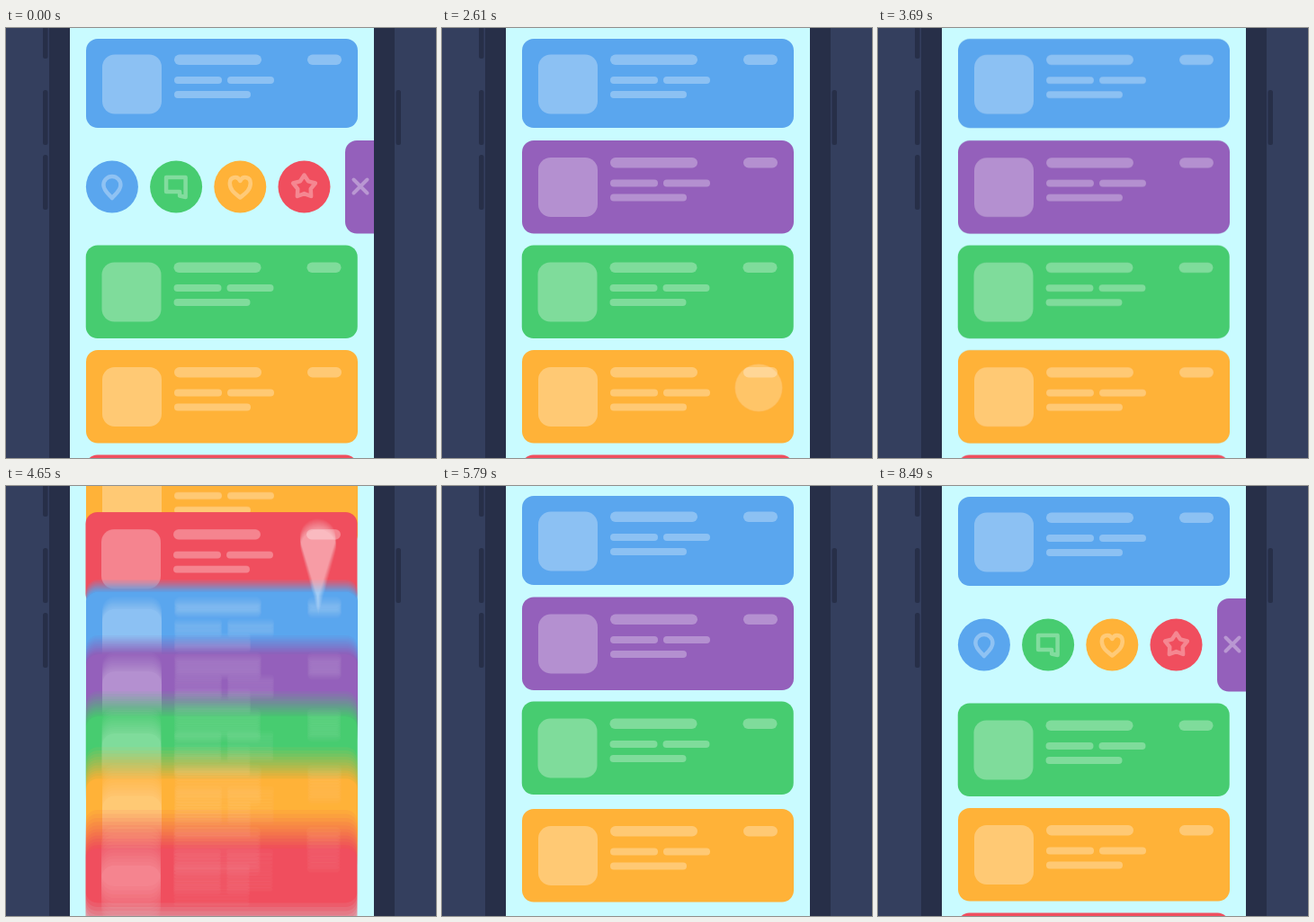
Write an HTML page with a canvas that moves like this. It is 478 px wide and 478 px high and loops after 8520 ms.

```html
<!DOCTYPE html>
<html lang="en">
<head>
<meta charset="utf-8">
<title>Card list</title>
<style>
html, body { margin: 0; height: 100%; overflow: hidden; background: #343f5e; }
canvas { display: block; width: 100vw; height: 100vh; }
</style>
</head>
<body>
<canvas id="stage" width="478" height="478"></canvas>
<script>
const SIZE = 478, LOOP = 8520, STEP = 30, SHUTTER = 15, SAMPLES = 12;
const BLUE = '#5aa6ee', PURPLE = '#9460bb', GREEN = '#47cc70', ORANGE = '#ffb238', RED = '#f04e5e';
const COLORS = [BLUE, PURPLE, GREEN, ORANGE, RED];
const BEZEL = '#272f48';

const out = document.getElementById('stage').getContext('2d');
const layer = document.createElement('canvas');
layer.width = layer.height = SIZE;
const c = layer.getContext('2d');

const clamp = v => Math.max(0, Math.min(1, v));
const ramp = (t, from, to) => clamp((t - from) / (to - from));

// Monotone cubic through [time, value] pairs, flat at both ends.
function track(t, keys) {
  const last = keys.length - 1;
  if (t <= keys[0][0]) return keys[0][1];
  if (t >= keys[last][0]) return keys[last][1];
  let i = 0;
  while (t >= keys[i + 1][0]) i++;
  const slope = j => (keys[j + 1][1] - keys[j][1]) / (keys[j + 1][0] - keys[j][0]);
  const tangent = j => {
    if (j === 0 || j === last) return 0;
    const a = slope(j - 1), b = slope(j);
    return a * b <= 0 ? 0 : 2 * a * b / (a + b);
  };
  const [t0, v0] = keys[i], [t1, v1] = keys[i + 1];
  const h = t1 - t0, u = (t - t0) / h, w = 1 - u;
  return v0 * w * w * (1 + 2 * u) + v1 * u * u * (3 - 2 * u)
    + h * u * w * (tangent(i) * w - tangent(i + 1) * u);
}

function box(x, y, w, h, r) {
  c.beginPath();
  c.roundRect(x, y, w, h, r);
  c.fill();
}

const white = alpha => `rgba(255,255,255,${alpha})`;

function drawPhone() {
  c.fillStyle = '#343f5e';
  c.fillRect(0, 0, SIZE, SIZE);
  c.fillStyle = BEZEL;
  c.fillRect(48, 0, 384, SIZE);
  box(41, -30, 5.5, 64, 2.5);
  box(41, 69, 5.5, 61, 2.5);
  box(41, 141, 5.5, 61, 2.5);
  box(433.5, 69, 5.5, 61, 2.5);
  c.fillStyle = '#c9fbff';
  c.fillRect(71, 0, 338, SIZE);
}

function drawCard(i, y, shift, inner) {
  const first = i === 0;
  const nudge = [0, 0, -0.5, 0, -1][i % 5];
  c.fillStyle = COLORS[i % 5];
  box(89 + shift + nudge / 2, first ? y + 1.5 : y, 302, first ? 99 : 103.5, 13);
  c.fillStyle = white(0.3);
  const x = 107 + inner + nudge, top = y + 19;
  box(x, top, 66, 66, 14);
  box(x + 80, top, 97, 11.5, 6);
  box(x + 228, top, 38, 11.5, 6);
  box(x + 80, top + 24.5, 53, 8, 4);
  box(x + 139, top + 24.5, 52, 8, 4);
  box(x + 80, top + 40.5, 85, 8, 4);
}

const ICONS = [
  'M0 12.5C-4 8-9.5 4-9.5-2A9.5 9.5 0 0 1 9.5-2C9.5 4 4 8 0 12.5Z',
  'M-11-10.5H10.5V11.5L4 10V5.5H-11Z',
  'M0 12C-5 8-11.5 4-11.5-4C-11.5-11-3-13 0-6.5C3-13 11.5-11 11.5-4C11.5 4 5 8 0 12Z',
  starPath(13, 7.6)
].map(d => new Path2D(d));

function starPath(outer, inner) {
  const points = Array.from({ length: 10 }, (_, i) => {
    const r = i % 2 ? inner : outer, a = i * Math.PI / 5;
    return `${r * Math.sin(a)} ${-r * Math.cos(a)}`;
  });
  return 'M' + points.join('L') + 'Z';
}

// The card edge pushes the last circle; the others are squeezed into a zigzag of touching circles.
function drawIcons(shift) {
  const edge = 89 + shift, squeeze = clamp((288 - shift) / 192);
  const gaps = [30, 26, 42].map(g => 71.2 + (g - 71.2) * squeeze);
  let x = Math.min(331.5, edge - 32 - 0.3 * Math.max(0, 185 - edge));
  const rise = g => Math.sqrt(Math.max(0, 57.5 ** 2 - g * g));
  let y = 176.5 + 0.34 * rise(gaps[2]);
  for (let i = 3; i >= 0; i--) {
    c.save();
    c.translate(x, y);
    c.fillStyle = [BLUE, GREEN, ORANGE, RED][i];
    c.beginPath();
    c.arc(0, 0, 29, 0, 7);
    c.fill();
    c.rotate((x - 118 - 71.2 * i) * 0.0023);
    c.strokeStyle = white(0.32);
    c.lineWidth = 4.5;
    c.lineJoin = 'round';
    c.stroke(ICONS[i]);
    c.restore();
    if (i) {
      x -= gaps[i - 1];
      y += rise(gaps[i - 1]) * (i === 2 ? 1 : -1);
    }
  }
}

function drawCross(x, size) {
  if (size <= 0) return;
  const r = 7.5 * size;
  c.strokeStyle = white(0.15 + 0.2 * size);
  c.lineWidth = 1 + 3 * size;
  c.lineCap = 'round';
  c.beginPath();
  c.moveTo(x - r, 176 - r);
  c.lineTo(x + r, 176 + r);
  c.moveTo(x + r, 176 - r);
  c.lineTo(x - r, 176 + r);
  c.stroke();
}

function drawTouch(t, from, to, x, y, tip = y) {
  const press = ramp(t, from, from + 150);
  const alpha = 0.44 * press * (1 - ramp(t, to, to + 120));
  if (!alpha) return;
  const r = 20 + 16 * (1 - press), reach = tip - y;
  c.fillStyle = white(alpha);
  c.beginPath();
  if (reach > r) {
    const a = Math.acos(r / reach);
    c.arc(x, y, r, Math.PI / 2 + a, Math.PI * 2.5 - a);
    c.lineTo(x, tip);
  } else {
    c.arc(x, y, r, 0, 7);
  }
  c.fill();
}

// Swipe up into a stack, then spring back to the resting list.
function cardY(i, p) {
  const rest = i ? 8.5 + 116.5 * i : 10.5;
  const swept = -235 + 66 * i + (i > 4 ? 16 : 0) + (i === 9 ? 8 : 0);
  const stack = 175 - 28.6 * (9 - i);
  const late = [-1, -1.5, -2, 1, 3.5][Math.min(i, 4)];
  return track(p, [
    [100, rest], [270, rest + (swept - rest) * (0.9 - 0.038 * i)],
    [390, swept], [450, stack], [540, stack - 3], [600, stack],
    [860, rest + 10], [1050, rest - 7], [1250, rest + 4],
    [1400, rest - 3], [1530, rest + late], [1680, rest]
  ]);
}

const closing = [[1140, 288], [1290, 270], [1410, 195], [1500, 96], [1590, 12],
  [1680, -8], [1860, 6], [2070, 0]];
const closingInner = [[1140, 432], [1290, 390], [1410, 220], [1500, 93], [1590, 14],
  [1700, -8], [1860, 8], [2070, 0]];
const opening = [[6600, 0], [6780, 25], [6870, 47], [6960, 72], [7110, 160], [7260, 255],
  [7380, 294], [7530, 284], [7680, 290], [7830, 288]];
const iconsIn = [[7050, -10], [7350, 120], [7600, 205], [7860, 250], [8200, 280], [8430, 288]];
const swipeY = [[130, 400], [270, 220], [390, 62], [450, 25], [540, 10]];
const swipeX = [[150, 352], [390, 347], [450, 341]];

function drawScene(t) {
  const early = t < 4000;
  const shift = track(t, early ? closing : opening);
  const inner = early ? track(t, closingInner) : shift * 1.5;
  const phase = t < 4260 ? t - 2520 : t - 4260;

  drawPhone();
  c.save();
  c.beginPath();
  c.rect(71, 0, 338, SIZE);
  c.clip();
  drawIcons(early ? shift : track(t, iconsIn));
  for (let i = 0; i < 10; i++) {
    const open = i === 1;
    drawCard(i, cardY(i, phase), open ? shift : 0, open ? inner : 0);
  }
  const fade = early ? 1 - ramp(t, 1150, 1400) : 1;
  drawCross(106 + shift, clamp((shift - 25) / 130) * fade);

  drawTouch(t, 360, 840, 394, 176);
  drawTouch(phase, 0, 470, track(phase, swipeX), track(phase, swipeY), track(phase - 60, swipeY));
  drawTouch(t, 6360, 6900, 341 + shift, 176);
  c.restore();
}

function frame(now) {
  const t = Math.floor((now % LOOP) / STEP) * STEP;
  for (let k = 0; k < SAMPLES; k++) {
    drawScene(t + SHUTTER * ((k + 0.5) / SAMPLES - 0.5));
    out.globalAlpha = 1 / (k + 1);
    out.drawImage(layer, 0, 0);
  }
  requestAnimationFrame(frame);
}
requestAnimationFrame(frame);
</script>
</body>
</html>
```
